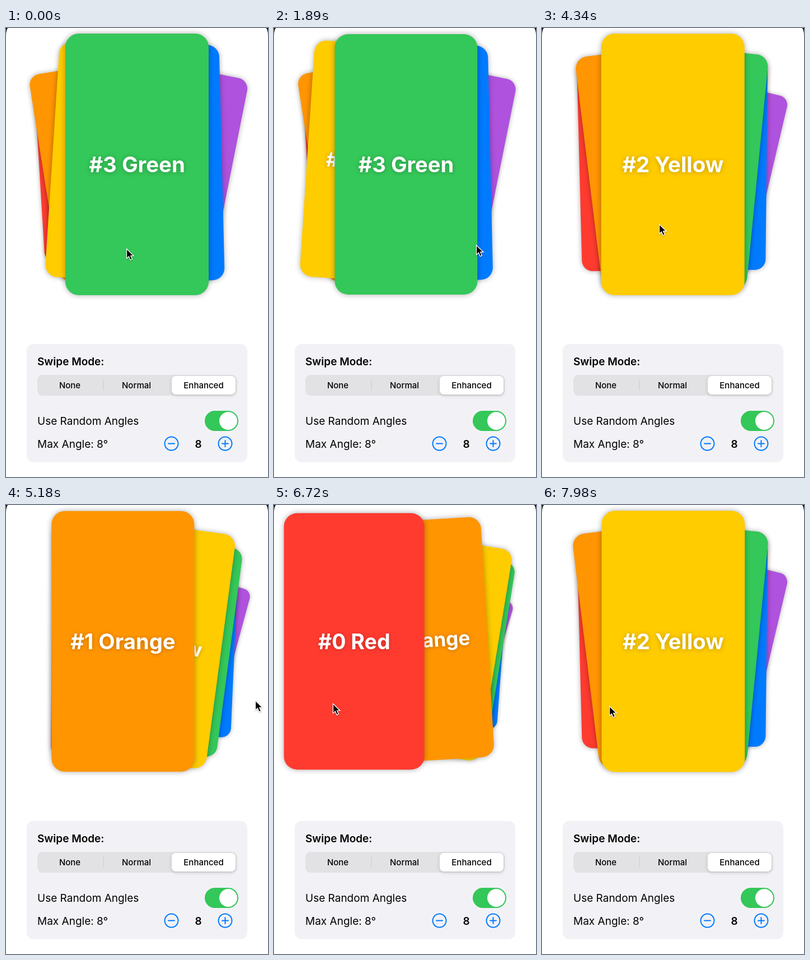
An HTML page that plays this animation: 468x800 px, repeating every 8000 ms.

```html
<!DOCTYPE html>
<html lang="en">
<head>
<meta charset="utf-8">
<title>Card deck</title>
<style>
  html, body { margin: 0; width: 100%; height: 100%; overflow: hidden; background: #000; }
  #stage {
    position: relative; width: 468px; height: 800px; overflow: hidden; background: #fff;
    border-radius: 4px 4px 0 0 / 14px 14px 0 0; font-family: Inter, "Open Sans", sans-serif;
  }
  .card {
    position: absolute; left: 106px; top: 10px; width: 256px; height: 466px; border-radius: 24px;
    box-shadow: 0 0 10px 1px rgba(0, 0, 0, .28); color: #fff; text-align: center; white-space: nowrap;
    font-size: 38.3px; font-weight: 700; line-height: 467px; text-shadow: 0 1px 8px rgba(0, 0, 0, .25);
  }
  svg { position: absolute; left: 0; top: 0; }
  #panel { font-size: 19px; }
  #panel .tab { font-size: 15px; font-weight: 500; text-anchor: middle; }
  #cursor { left: -1px; top: -1px; z-index: 100; filter: drop-shadow(0 1px 1px rgba(0, 0, 0, .3)); }
</style>
</head>
<body>
<div id="stage">
  <svg id="panel" width="468" height="800">
    <rect x="37" y="563" width="394" height="210.5" rx="12" fill="#f2f2f6"/>
    <text x="56" y="600.5" font-weight="600">Swipe Mode:</text>
    <rect x="56" y="618" width="356" height="37" rx="9" fill="#e2e2e5"/>
    <path d="M174 627v19" stroke="#cbcbcf"/>
    <rect x="296" y="620" width="114" height="33" rx="7.5" fill="#fff" style="filter:drop-shadow(0 2px 3px rgba(0,0,0,.16))"/>
    <text class="tab" x="114" y="642">None</text>
    <text class="tab" x="233" y="642">Normal</text>
    <text class="tab" x="353" y="642">Enhanced</text>
    <text x="56" y="707">Use Random Angles</text>
    <rect x="355" y="682" width="60" height="36" rx="18" fill="#34c759"/>
    <circle cx="397" cy="700" r="16" fill="#fff"/>
    <text x="56" y="747.5">Max Angle: 8°</text>
    <g fill="none" stroke="#007aff" stroke-width="2" stroke-linecap="round">
      <circle cx="295.5" cy="740.5" r="12"/>
      <circle cx="391.5" cy="740.5" r="12"/>
      <path d="M290 740.5h11M386 740.5h11M391.5 735v11"/>
    </g>
    <text x="343.5" y="747.5" font-weight="600" text-anchor="middle">8</text>
  </svg>
  <svg id="cursor" width="20" height="28">
    <path d="M1.5 1.5V18.5L5.4 15 8.2 21.4 11.4 20 8.7 13.8H14Z" stroke="#fff" stroke-width="1.3"/>
  </svg>
</div>
<script>
const stage = document.getElementById('stage');
const cursor = document.getElementById('cursor');
const LOOP = 8000, SPACING = 40.5, SPRING = 11.4, PAGE_WIDTH = 256, TRAVEL = 350;

const mix = (a, b, k) => a + (b - a) * k;
const ramp = (t, a, b) => Math.min(1, Math.max(0, (t - a) / (b - a)));
const smooth = (t, a, b) => { const u = ramp(t, a, b); return u * u * (3 - 2 * u); };

// name, colour, tilt in degrees
const cards = [
  ['Red', '#ff3b30', 2.5], ['Orange', '#ff9500', -5], ['Yellow', '#ffcc00', 5.7],
  ['Green', '#34c759', 3.6], ['Blue', '#007aff', -3.4], ['Purple', '#af52de', 7.3]
].map(([name, color, tilt], index) => {
  const el = document.createElement('div');
  el.className = 'card';
  el.textContent = `#${index} ${name}`;
  el.style.background = color;
  stage.append(el);
  return { el, tilt, index };
});

// Each swipe drags by a fraction of a page, then springs to the page `step` away.
const rest = { start: 0, release: 0, from: 3, last: 3, page: 3, x: 215 };
const swipes = [rest];
function swipe(start, release, drag, step, x) {
  const from = swipes.at(-1).page;
  swipes.push({ start, release, from, last: from + drag, page: from + step, x, x0: x + drag * PAGE_WIDTH });
}
swipe(1150, 1530, -.57, 0, 361);
swipe(2675, 2770, -.6, -1, 406);
swipe(3430, 3565, .3, 0, 209);
swipe(4735, 4818, -.6, -1, 445);
swipe(5575, 5760, -.6, -1, 369);
swipe(6620, 6825, .4, 1, 53);
swipe(7330, 7454, .45, 1, 120);

// The selected card swings far out while dragged; the others shift evenly.
function pose(index, progress) {
  const d = index - progress;
  const swing = index === Math.round(progress) ? 20 * Math.abs(Math.sin(Math.PI * progress)) : 1;
  return { x: d * SPACING * swing, scale: 1 - .1 * Math.abs(d) };
}

function drawDeck(t, { start, release, from, last, page }) {
  const dragged = mix(from, last, ramp(t, start, release));
  const goal = t < release ? dragged : page;
  const u = SPRING * Math.max(0, t - release) / 1000;
  const k = 1 - (1 + u) * Math.exp(-u);
  const progress = mix(dragged, goal, k);
  for (const { el, tilt, index } of cards) {
    const a = pose(index, dragged), b = pose(index, goal);
    const angle = index === Math.round(goal) ? 0 : tilt + 2 * (index - progress);
    el.style.transform =
      `rotate(${angle}deg) scale(${mix(a.scale, b.scale, k)}) translateX(${mix(a.x, b.x, k)}px)`;
    el.style.zIndex = Math.round(50 - 10 * Math.abs(index - goal));
  }
}

// The pointer follows a drag, waits, then moves to where the next drag begins.
function drawPointer(t, now, next) {
  let x = t < now.release ? mix(now.x0, now.x, ramp(t, now.start, now.release)) : now.x;
  if (next) x = mix(x, next.x0, smooth(t, next.start - TRAVEL, next.start));
  const y = 393 - 45 * smooth(t, 1000, 4700) + 10 * smooth(t, 5200, LOOP);
  cursor.style.transform = `translate(${x}px, ${y}px)`;
}

function draw(now) {
  const t = now % LOOP;
  const i = swipes.findLastIndex(s => s.start <= t);
  drawDeck(t, swipes[i]);
  drawPointer(t, swipes[i], swipes[i + 1]);
  requestAnimationFrame(draw);
}
requestAnimationFrame(draw);
</script>
</body>
</html>
```
